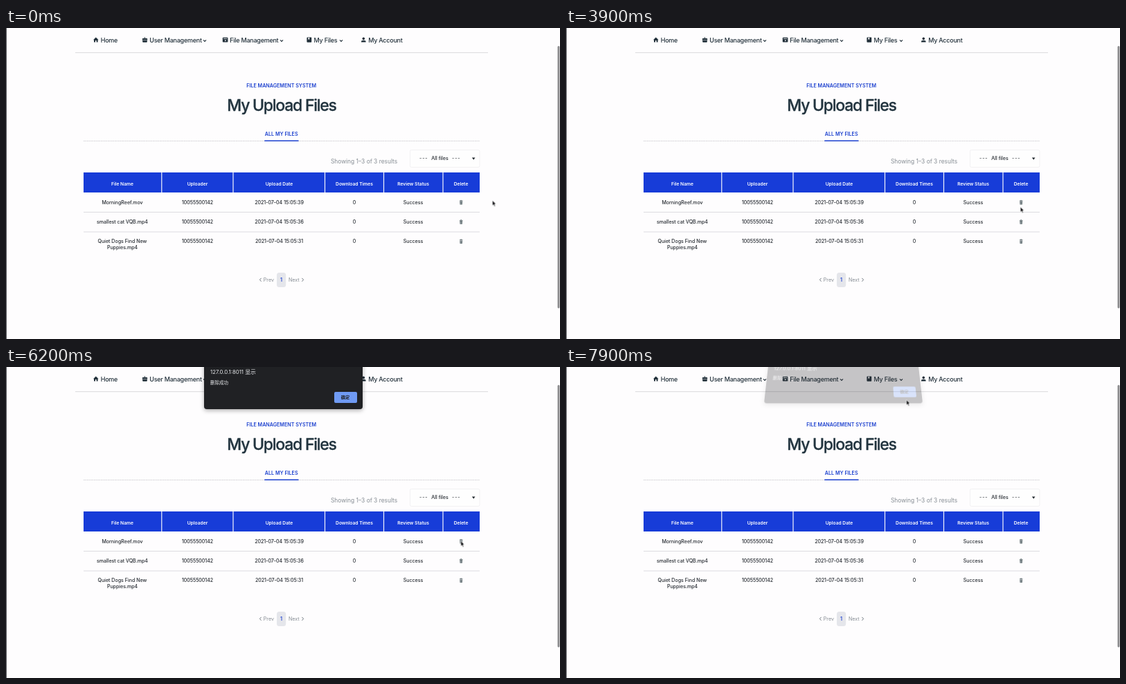
Animation, 800 px wide and 450 px high, one loop 8000 ms. Source, as an HTML page:

```html
<!DOCTYPE html>
<html lang="en">
<head>
<meta charset="utf-8">
<title>My Upload Files</title>
<style>
  html, body { margin: 0; width: 100%; height: 100%; overflow: hidden; background: #fefdfe; }
  .stage { position: relative; width: 800px; height: 450px; overflow: hidden; font-family: Inter, "Noto Sans CJK SC", "Noto Sans CJK", sans-serif; }
  svg { position: absolute; left: 0; top: 0; display: block; }
  .nav { font-size: 9px; font-weight: 500; letter-spacing: -.25px; fill: #22303a; }
  .icon { fill: #22303a; }
  .chevron { fill: none; stroke: #22303a; stroke-width: 1.2; }
  .mid { text-anchor: middle; }
  .blue { fill: #1c40cf; font-weight: 600; font-size: 7.15px; }
  .title { font-size: 23px; font-weight: 500; letter-spacing: -1.25px; fill: #22343f; stroke: #22343f; stroke-width: .3px; }
  .head { font-size: 6.7px; font-weight: 600; fill: #fff; }
  .cell { font-size: 7.1px; fill: #20262c; stroke: #20262c; stroke-width: .1px; }
  .muted { fill: #858c93; }

  .dialog {
    position: absolute; left: 286px; top: -20px; width: 229px; height: 80.5px;
    border-radius: 4px; background: #202124; color: #e8eaed;
    box-shadow: 0 2px 6px rgba(0, 0, 0, .32);
    transform-origin: 50% 100%;
    animation: dialog 8s linear infinite;
  }
  .dialog span { position: absolute; left: 9px; white-space: nowrap; line-height: 10px; }
  .host { top: 22px; font-size: 7.8px; }
  .note { top: 37.5px; font-size: 6.5px; }
  .dialog .ok {
    left: 187.5px; top: 55.5px; width: 33px; height: 16.5px; line-height: 16px;
    border-radius: 2px; background: #6f9af3; color: #202124;
    font-size: 6.2px; font-weight: 600; text-align: center;
  }
  .cursor { animation: move 8s linear infinite; }
  .hand { animation: hand 8s step-end infinite; }
  .arrow { animation: arrow 8s step-end infinite; }

  @keyframes dialog {
    0%, 72.5% { opacity: 0; transform: translateY(-8.5px) perspective(160px) rotateX(9deg); }
    76.25%, 97% { opacity: 1; transform: translateY(0) perspective(160px) rotateX(0deg); }
    98.75%, 100% { opacity: .26; transform: translateY(-8.5px) perspective(160px) rotateX(9deg); }
  }
  @keyframes move {
    0%, 1.25% { transform: translate(702.4px, 249.4px); animation-timing-function: ease-in-out; }
    10%, 23.75% { transform: translate(655.6px, 249px); animation-timing-function: ease-in-out; }
    27.5%, 50% { transform: translate(656.2px, 258.8px); animation-timing-function: ease-in-out; }
    55%, 80% { transform: translate(656.8px, 251.6px); animation-timing-function: ease-in-out; }
    90%, 91.25% { transform: translate(526.5px, 36.5px); animation-timing-function: ease-in-out; }
    96.25%, 100% { transform: translate(491.6px, 47.5px); }
  }
  @keyframes hand {
    0% { opacity: 0; }
    9% { opacity: 1; }
    25% { opacity: 0; }
    53% { opacity: 1; }
    74% { opacity: 0; }
  }
  @keyframes arrow {
    0% { opacity: 1; }
    9% { opacity: 0; }
    25% { opacity: 1; }
    53% { opacity: 0; }
    74% { opacity: 1; }
  }
</style>
</head>
<body>
<div class="stage">
  <svg width="800" height="450" viewBox="0 0 800 450">
    <defs>
      <path id="chev" class="chevron" d="M-2-1L0 1L2-1"/>
      <g id="bin" fill="#6b777b">
        <path d="M-2.3-2.6h1.4v-.6h1.8v.6h1.4v.8h-4.6z"/>
        <path d="M-2-1.4h4l-.3 4.6h-3.4z"/>
        <path d="M-.6-.6v3M.6-.6v3" stroke="#b6bec0" stroke-width=".4"/>
      </g>
    </defs>
    <rect width="800" height="450" fill="#fefdfe"/>
    <rect width="1" height="450" fill="#55565a"/>
    <rect x="796.5" y="26" width="3" height="379.5" rx="1.5" fill="#8b8b8d"/>

    <g class="icon">
      <path d="M126 17.3L129.8 13.6L133.6 17.3H132.6V20.5H130.6V18H129V20.5H127V17.3z"/>
      <path d="M200 13.2h1v1.8h2.2q1 0 1 1v1h-7.4v-1q0-1 1-1h2.2zM196.8 17.6h7.4l-.7 3.1h-6z"/>
      <path fill-rule="evenodd" d="M313.6 13.8h6q.8 0 .8.8v5.2q0 .8-.8.8h-6q-.8 0-.8-.8v-5.2q0-.8.8-.8zM314 15.2v.8h5.2v-.8zM316 17.6h1.6v1.4h-1.6z"/>
      <path fill-rule="evenodd" d="M435.4 13.4h5.2q.6 0 .6.6v6q0 .7-.6.7h-5.2q-1 0-1-.9v-5.5q0-.9 1-.9zM436.4 14v3l.9-.7l.9.7v-3z"/>
      <circle cx="516.3" cy="15.4" r="1.8"/>
      <path d="M513 20.4v-.8q0-1.9 3.3-1.9t3.3 1.9v.8z"/>
    </g>
    <g class="nav">
      <text x="136.7" y="21.4">Home</text>
      <text x="207.3" y="20.6">User Management</text>
      <text x="323.2" y="20.6">File Management</text>
      <text x="444.6" y="20.6">My Files</text>
      <text x="523.2" y="20.6">My Account</text>
    </g>
    <use href="#chev" x="287" y="18.3"/>
    <use href="#chev" x="398" y="18.3"/>
    <use href="#chev" x="484" y="18.3"/>
    <path d="M100 35.7H696" stroke="#d9d9dc"/>

    <g class="mid">
      <text class="blue" x="397.7" y="85.6">FILE MANAGEMENT SYSTEM</text>
      <text class="title" x="398" y="120">My Upload Files</text>
      <text class="blue" x="397.7" y="155.6">ALL MY FILES</text>
    </g>
    <path d="M112 163.5H684" stroke="#c4c5c8" stroke-width=".8" stroke-dasharray="1.6 .9"/>
    <path d="M373.3 163.2H422.5" stroke="#1c40cf" stroke-width="1.6"/>

    <text class="muted" x="469" y="195.5" font-size="8.4">Showing 1–3 of 3 results</text>
    <rect x="583.5" y="176.5" width="100.5" height="25" rx="2" fill="#fefefe" stroke="#f2f1f3"/>
    <g class="cell mid">
      <text x="603.2" y="191" letter-spacing=".8">---</text>
      <text x="626.5" y="191">All files</text>
      <text x="650.2" y="191" letter-spacing=".8">---</text>
    </g>
    <path d="M672.9 187.4h4.6l-2.3 3.4z" fill="#20262c"/>

    <rect x="112" y="209" width="572" height="29" fill="#173cd8"/>
    <path d="M224.8 209v29M328 209v29M460.5 209v29M545.5 209v29M631 209v29" stroke="#f3f4fc" stroke-width="1.2"/>
    <path d="M112 266.5H684M112 295H684" stroke="#d8d9dd" stroke-width=".9"/>
    <g id="table" class="mid">
      <text class="cell" x="168" y="319.8">Puppies.mp4</text>
    </g>

    <rect x="391" y="354" width="13.2" height="21" rx="3.5" fill="#e5e6eb"/>
    <text class="blue mid" x="397.6" y="367">1</text>
    <g class="muted" font-size="7.1">
      <text x="371.8" y="366.8">Prev</text>
      <text x="408" y="366.8">Next</text>
    </g>
    <path d="M368.6 361.9L366.4 364.3L368.6 366.7M427.4 361.9L429.6 364.3L427.4 366.7" fill="none" stroke="#6d757d"/>
  </svg>

  <div class="dialog">
    <span class="host">127.0.0.1:8011 显示</span>
    <span class="note">删除成功</span>
    <span class="ok">确定</span>
  </div>

  <svg width="800" height="450" viewBox="0 0 800 450">
    <g class="cursor" stroke="#fff" stroke-width=".7" stroke-linejoin="round" fill="#0c0c0e">
      <path class="arrow" d="M0 0V7.6L1.7 6.1L2.9 8.9L4.2 8.3L3 5.6H5.2z"/>
      <path class="hand" stroke="#17181a" fill="#fff" d="M-.8 .9Q-.8 0 0 0T.8 .9V3.5Q1.6 2.9 2.1 3.7Q2.8 3.2 3.2 4Q4.3 3.7 4.3 5Q4.3 7.3 3.2 9.2H-.7Q-1.1 7.6-2.9 5.8Q-3.3 4.8-2.3 4.6Q-1.5 4.8-.8 5.6z"/>
    </g>
  </svg>
</div>
<script>
  const NS = "http://www.w3.org/2000/svg";
  const table = document.getElementById("table");
  const columns = [168, 276.5, 394.5, 503, 588, 657];
  const phone = "10055500142";

  function add(tag, attrs, text = "") {
    const el = document.createElementNS(NS, tag);
    for (const key in attrs) el.setAttribute(key, attrs[key]);
    el.textContent = text;
    table.append(el);
  }
  function row(cls, y, cells) {
    cells.forEach((text, i) => add("text", { class: cls, x: columns[i], y }, text));
  }

  row("head", 227.7, ["File Name", "Uploader", "Upload Date", "Download Times", "Review Status", "Delete"]);
  const files = [["MorningReef.mov", 39], ["smallest cat VQB.mp4", 36], ["Quiet Dogs Find New", 31]];
  files.forEach(([name, sec], i) => {
    const y = 252 + i * 28.3;
    row("cell", y + 2.7, [name, phone, `2021-07-04 15:05:${sec}`, "0", "Success"]);
    add("use", { href: "#bin", x: 657.2, y: y + .2 });
  });
</script>
</body>
</html>
```
